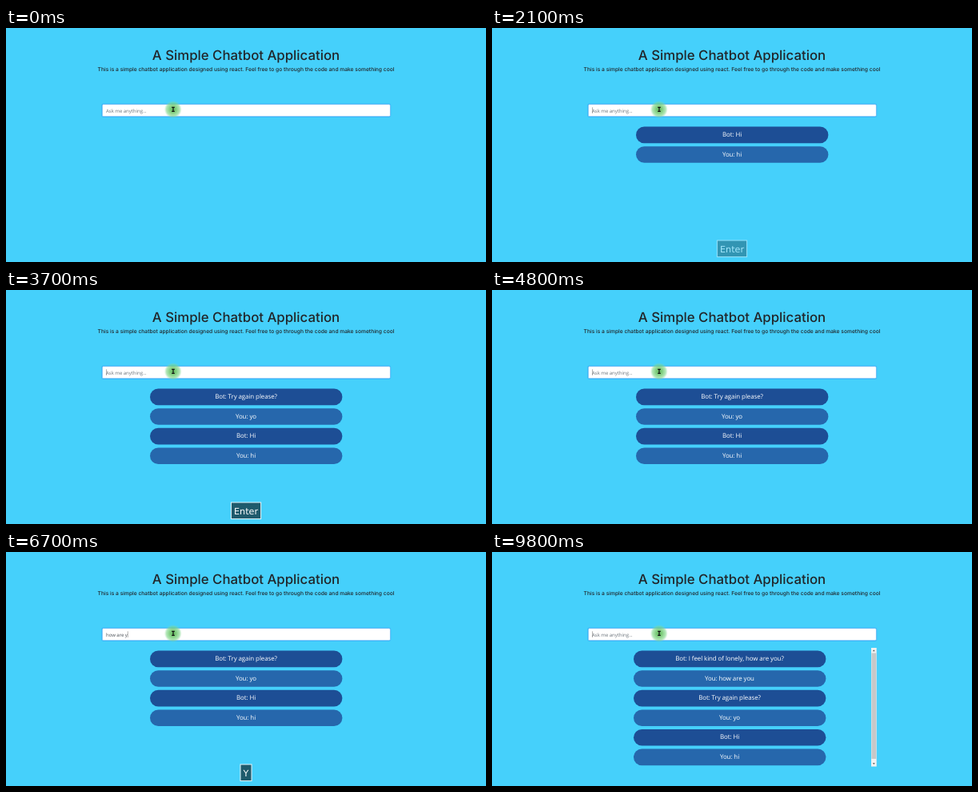
Write an HTML page that moves like this. It is 600x293 px and loops after 10 s.

```html
<!DOCTYPE html>
<html lang="en">
<head>
<meta charset="utf-8">
<title>A Simple Chatbot Application</title>
<style>
html, body { margin: 0; width: 100%; height: 100%; overflow: hidden; background: #45d0fb; }
svg { display: block; }
text { font-family: "Open Sans", "Noto Sans", sans-serif; white-space: pre; text-rendering: geometricPrecision; }
.mid { text-anchor: middle; }
.head { font-family: Inter, sans-serif; font-weight: 500; fill: #212529; }
.key { font: 11.2px "DejaVu Sans", Verdana, sans-serif; fill: #fff; }
.msg { font-size: 7.9px; letter-spacing: -.07px; fill: #fff; }
.field { font-size: 6.05px; letter-spacing: -.04px; }
</style>
</head>
<body>
<svg width="600" height="293" viewBox="0 0 600 293">
  <defs>
    <radialGradient id="glow">
      <stop offset="0" stop-color="#4fb04a" stop-opacity=".9"/>
      <stop offset=".4" stop-color="#68c566" stop-opacity=".8"/>
      <stop offset=".75" stop-color="#7dd685" stop-opacity=".6"/>
      <stop offset="1" stop-color="#8fdca0" stop-opacity="0"/>
    </radialGradient>
  </defs>
  <text class="head mid" x="300" y="39.8" font-size="16.8">A Simple Chatbot Application</text>
  <text class="head mid" x="300" y="53.7" font-size="6.7">This is a simple chatbot application designed using react. Feel free to go through the code and make something cool</text>

  <rect x="119.2" y="94.5" width="362" height="17.4" rx="2.4" fill="#007bff" opacity=".25"/>
  <rect x="120.3" y="95.6" width="360.1" height="15.2" rx="1.5" fill="#fff" stroke="#5aaff0" stroke-width=".7"/>
  <text id="field" class="field" x="125" y="105.5"></text>
  <rect id="caret" y="99.3" width=".5" height="7.6" fill="#666"/>

  <circle cx="208.8" cy="102" r="11" fill="url(#glow)"/>
  <path d="M207.2 99.4h3.6M209 99.4v5M207.2 104.4h3.6" fill="none" stroke="#111" stroke-width="1.2"/>

  <g id="list"></g>
  <g id="bar">
    <rect x="474" y="120" width="6.7" height="148.6" fill="#f1f1f1"/>
    <rect x="474.4" y="126.5" width="5.9" height="132.5" fill="#c6c8c9"/>
    <path d="M475.8 124.3l1.5-1.7 1.5 1.7zM475.8 264.3l1.5 1.7 1.5-1.7z" fill="#505050"/>
  </g>
  <g id="key">
    <rect id="box" y="266" height="20.6" fill="#1f5a6c" stroke="#e8f4f8" stroke-width="1"/>
    <text id="label" class="key mid" x="300" y="280.5"></text>
  </g>
</svg>
<script>
const LOOP = 10000;
const $ = id => document.getElementById(id);

// [time, key]
const keys = [
  [400, 'H'], [700, 'I'], [1000, 'Enter'],
  [2700, 'Y'], [3100, 'O'], [3600, 'Enter'],
  [5100, 'H'], [5200, 'O'], [5400, 'W'], [5600, 'Space'],
  [5900, 'A'], [6000, 'R'], [6200, 'E'], [6400, 'Space'],
  [6700, 'Y'], [7000, 'O'], [7300, 'U'], [7800, 'Enter']
];
const replies = ['Hi', 'Try again please?', 'I feel kind of lonely, how are you?'];
const caretOn = [[400, 900], [1000, 1500], [2000, 2500], [2700, 4200],
  [4700, 5700], [6000, 7200], [7300, 7800], [8400, 8950], [9500, LOOP]];

function stateAt(t) {
  const state = { typed: '', messages: [], key: '', age: Infinity };
  let sent = 0;
  for (const [time, key] of keys) {
    if (time > t) break;
    state.key = key;
    state.age = t - time;
    if (key === 'Enter') {
      state.messages.unshift('You: ' + state.typed);
      if (t >= time + 100) state.messages.unshift('Bot: ' + replies[sent]);
      sent++;
      state.typed = '';
    } else {
      state.typed += key === 'Space' ? ' ' : key.toLowerCase();
    }
  }
  return state;
}

function drawMessages(messages) {
  const full = messages.length > 5;
  const left = full ? 177 : 180;
  $('bar').style.display = full ? '' : 'none';
  $('list').innerHTML = messages.map((text, i) => {
    const y = 123.6 + i * 24.6;
    const fill = text.startsWith('Bot') ? '#1d4e95' : '#2667ac';
    return `<rect x="${left}" y="${y}" width="240.4" height="20.6" rx="10.3" fill="${fill}"/>
      <text class="msg mid" x="${left + 120}" y="${y + 12.3}">${text}</text>`;
  }).join('');
}

function drawKey(key, age) {
  const visible = age < 1200;
  $('key').style.display = visible ? '' : 'none';
  if (!visible) return;
  $('key').setAttribute('opacity', Math.min(1, 1 - (age - 700) / 800));
  $('label').textContent = key;
  const w = $('label').getComputedTextLength() + 7.2;
  $('box').setAttribute('x', 300 - w / 2);
  $('box').setAttribute('width', w);
}

function drawField(typed, t) {
  const field = $('field');
  field.textContent = typed || 'Ask me anything...';
  field.setAttribute('fill', typed ? '#495057' : '#6c757d');
  $('caret').setAttribute('x', 125 + (typed ? field.getComputedTextLength() : 0));
  const on = caretOn.some(([from, to]) => t >= from && t < to);
  $('caret').style.display = on ? '' : 'none';
}

let shown;
function frame() {
  const t = performance.now() % LOOP;
  const { typed, messages, key, age } = stateAt(t);
  drawField(typed, t);
  drawKey(key, age);
  const current = messages.join('\n');
  if (current !== shown) {
    drawMessages(messages);
    shown = current;
  }
  requestAnimationFrame(frame);
}
frame();
</script>
</body>
</html>
```
